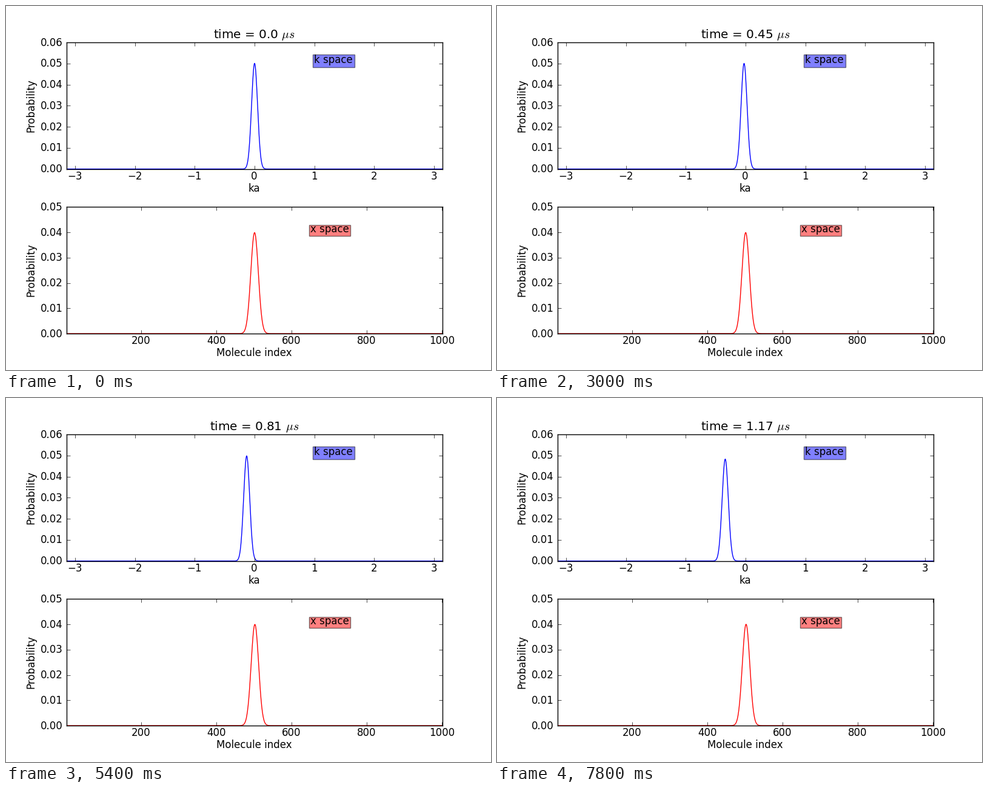
Write a matplotlib script that moves like this. It is 800 by 600 pixels and loops after 8 s.

```python
import numpy as np
import matplotlib.pyplot as plt
from matplotlib.animation import FuncAnimation
from matplotlib.patches import Rectangle

plt.style.use("classic")

FRAMES = 40
STEP_MS = 200
DT = 0.03            # microseconds per frame
OMEGA = np.pi / 3    # drive frequency
N = 1001
SIGMA_X = 10.0
HEIGHT = 600
PT = 100 / 72        # pixels per point
DIGIT_H, LETTER_H = 12, 13   # glyph heights in pixels

sites = np.arange(1, N + 1)
ka = np.linspace(-np.pi, np.pi, N)


def gauss(x, mean, sigma):
    return np.exp(-((x - mean) / sigma) ** 2 / 2) / (sigma * np.sqrt(2 * np.pi))


def k_density(t):
    """Packet pushed by a sin^2 force, slowly broadened by its gradient."""
    shift = np.pi / 4 * (t / 2 - np.sin(2 * OMEGA * t) / (4 * OMEGA))
    sigma = np.hypot(1 / (2 * SIGMA_X), 0.04 * shift)
    return gauss(ka, -shift, sigma) * 2 * np.pi / N


def x_density(t):
    drive = np.sin(OMEGA * t) ** 2
    return gauss(sites, 501 + 1.5 * drive, SIGMA_X * (1 - 0.004 * drive))


def put(x, y, text, ha="center", **kw):
    """Text with its baseline at stage pixel (x, y), rounded down to whole pixels."""
    fig.text(x - 0.5, HEIGHT - y + 0.5, text, ha=ha, va="baseline",
             transform=None, **kw)


def to_stage(ax, x, y):
    px, py = ax.transData.transform((x, y))
    return px, HEIGHT - py


def tag(ax, x, y, text, color, box):
    """Text at a data point over a translucent box given in stage pixels."""
    left, top, right, bottom = box
    ax.add_patch(Rectangle((left, HEIGHT - bottom), right - left, bottom - top,
                           transform=None, facecolor=color, edgecolor="black",
                           linewidth=1, alpha=0.5, zorder=2.8))
    put(*to_stage(ax, x, y), text, ha="left")


def setup(ax, xlim, ymax, xlabel, xticks):
    yticks = np.arange(0, ymax + 0.005, 0.01)
    ax.set_xlim(*xlim)
    ax.set_ylim(0, ymax)
    ax.set_xticks(xticks)
    ax.set_yticks(yticks)
    ax.tick_params(labelbottom=False, labelleft=False)

    left, bottom = to_stage(ax, xlim[0], 0)
    base = bottom + 4 * PT + DIGIT_H
    for v in xticks:
        put(to_stage(ax, v, 0)[0], base, str(v).replace("-", "\u2212"))
    for v in yticks:
        put(left - 4 * PT, to_stage(ax, xlim[0], v)[1] + DIGIT_H / 2 + 0.01,
            f"{v:.2f}", ha="right")

    put(to_stage(ax, sum(xlim) / 2, 0)[0], base + 5 * PT + LETTER_H, xlabel)
    put(46.5, to_stage(ax, xlim[0], ymax / 2)[1], "Probability",
        rotation=90, rotation_mode="anchor")


fig, (ax_k, ax_x) = plt.subplots(2, 1, figsize=(8, 6), dpi=100, facecolor="white")
fig.subplots_adjust(left=0.125, right=0.9, bottom=0.1, top=0.9, hspace=0.3)

setup(ax_k, (-np.pi, np.pi), 0.06, "ka", range(-3, 4))
setup(ax_x, (1, N), 0.05, "Molecule index", range(200, 1001, 200))
tag(ax_k, 1, 0.05, "k space", "blue", (506, 80, 575, 101))
tag(ax_x, 650, 0.04, "x space", "red", (500, 361, 568, 379))

k_line, = ax_k.plot(ka, k_density(0), "b-", lw=1)
x_line, = ax_x.plot(sites, x_density(0), "r-", lw=1)
title = ax_k.set_title("")


def draw(i):
    t = round(DT * i, 2)
    k_line.set_ydata(k_density(t))
    x_line.set_ydata(x_density(t))
    title.set_text(rf"time = {t} $\mu s$")
    return k_line, x_line, title


anim = FuncAnimation(fig, draw, frames=FRAMES, interval=STEP_MS,
                     repeat=True, repeat_delay=0, blit=False)
plt.show()
```
